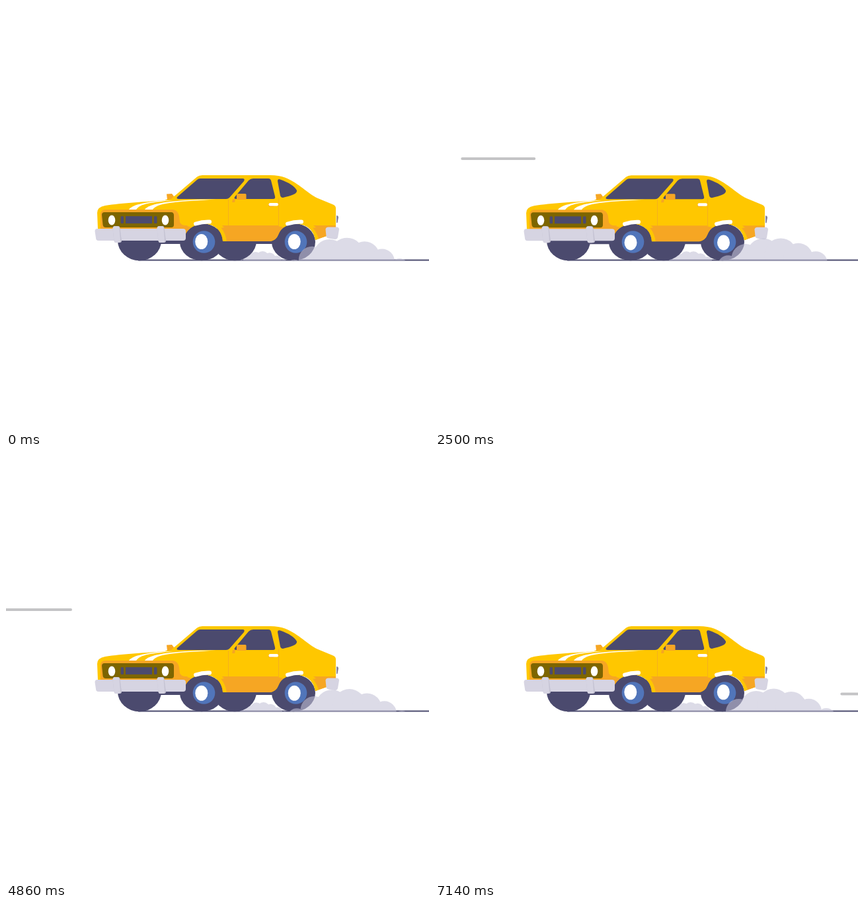
Recreate the animation shown at these times as an HTML page. Size 640 by 640 pixels, loop 7210 ms.

```html
<!DOCTYPE html>
<html lang="en">
<head>
<meta charset="utf-8">
<title>Yellow car</title>
<style>
  html, body { margin: 0; width: 100%; height: 100%; overflow: hidden; background: #fff; }
  svg { display: block; width: 100vw; height: 100vh; }
  .dark { fill: #4b4a6e; }
  .yellow { fill: #ffc700; }
  .orange { fill: #f6a623; }
  .metal { fill: #d6d4e2; }
  .white { fill: #fff; }
  .blue { fill: #5175ba; }
  .seam { stroke: #f6b01c; stroke-width: 1; }
  .shine { fill: none; stroke: #fff; stroke-width: 6; stroke-linecap: round; }
  .rim { fill: none; stroke: #ffc700; stroke-width: 5; }
  .streak { stroke: #c4c4c6; stroke-width: 4; stroke-linecap: round; }
  .dash { stroke: #eac782; stroke-width: 6; stroke-linecap: round; }
  .dust { fill: #c3c1d6; }
</style>
</head>
<body>
<svg viewBox="0 0 640 640">
  <defs>
    <path id="shell" d="M139 338 L138 313 Q138 304 150 302 C175 298 215 296 240 294 L255 287.500 L289 258.500 Q292 256 297 256 L400 256 Q413 256 422 259.500 C445 269 455 283 472 291 L495 300.500 Q499 302 499 306 L499 337 L485 348 L468 354 C466 339 455 329.500 439 329.500 C426 329.500 416 335 412 346 Q409 354 400 356 L328 356 C327 339 315 329.500 300 329.500 C286 329.500 276 336 271 346 L268 350 L139 350 Z"/>
    <path id="screen" d="M259 289 L289 263 Q291 261 294 261 L358 261 Q362 261 360 265 L338 290 Q336 292 333 292 L262 292 Q257 292 259 289 Z"/>
    <clipPath id="inShell"><use href="#shell"/></clipPath>
    <clipPath id="inScreen"><use href="#screen"/></clipPath>
    <clipPath id="aboveGround"><rect y="300" width="640" height="85.200"/></clipPath>
  </defs>

  <g id="streaks"></g>
  <path d="M200 384.500 H640" stroke="#4b4a6e" stroke-width="1.800"/>
  <g id="dashes"></g>

  <g clip-path="url(#aboveGround)" opacity=".58">
    <g id="farDust" class="dust" transform="translate(385 384.500) scale(.4) translate(-508 -384.500)"></g>
  </g>

  <g class="dark">
    <ellipse cx="202" cy="355" rx="33" ry="30.200"/>
    <ellipse cx="346" cy="355" rx="33" ry="30.200"/>
    <ellipse cx="296" cy="357" rx="33" ry="28.200"/>
    <ellipse cx="435" cy="357" rx="33" ry="28.200"/>
  </g>

  <g id="car">
    <path class="dark" d="M232 345 H275 V360 H232 Z M320 350 H415 V360 H320 Z"/>
    <use href="#shell" class="yellow"/>
    <g clip-path="url(#inShell)">
      <path class="orange" d="M139 350 V340 L143 337 V314 Q144 308 150 308 H252 Q260 308.500 262 318 L263 327 Q265 332 272 332 H500 V360 H139 Z"/>
      <path class="yellow" d="M274 333 Q284 324 300 323 Q320 324 330 335 L300 340 Z M412 333 Q424 323 440 323 Q456 324 469 335 L440 340 Z"/>
      <path class="rim" d="M308 328.500 Q328 333 331.500 357 M448 328.500 Q466 334 471.500 356"/>
    </g>
    <path class="white" d="M186 308 C191 300 215 296 243 294 L253 294 C220 297 203 299 197 308 Z M210 308 C216 299 246 295 290 293 L318 292.500 C262 296 228 297 222 308 Z"/>
    <use href="#screen" class="dark"/>
    <g clip-path="url(#inScreen)">
      <path id="glare" class="white" d="M285 258 H306 L309 295 H288 Z M315 258 H320 L323.500 295 H318.500 Z"/>
    </g>
    <path class="dark" d="M346 289 L367 264 Q370 261 374 261 H397 Q400 261 401 264 L407 288 Q408 292 404 292 H349 Q344 292 346 289 Z M411 265 Q411 261 415 262.500 C428 267 437 273 440 279 C441 284 432 287 419 290 Q416 290 415 287 Z"/>
    <path class="seam" d="M336.500 293 V332 M412.500 290 V332"/>
    <path class="orange" d="M243 284.500 L251 284 L254 288 L250 292 L244 293 Z M343 292 H347 L346 297 H342 Z"/>
    <rect class="orange" x="349" y="284" width="14.500" height="9" rx="1.500"/>
    <rect class="orange" x="397" y="298.500" width="9" height="5" rx="2"/>
    <rect class="white" x="397.500" y="298" width="14.500" height="4.500" rx="2.200"/>
    <path class="shine" d="M287 329.500 Q298 326 308 326.500 M426 329.500 Q437 326 447 326.500"/>
    <path d="M500 317 Q503 317 503 320 L501.500 328 H500 Z" fill="#85849f"/>
    <path class="metal" d="M487 334.500 H501 Q504 335 504 338 L502 350 Q501 353 498 353 L488 351.500 Q485 351 484.500 348 L483.500 338 Q483.500 335 487 334.500 Z"/>
    <path d="M149 312 H250 Q253.500 312 254 316 V331 Q254 335 250 335 H151 Q147 335 146.500 331 L145 316 Q145 312 149 312 Z" fill="#7d6500"/>
    <path class="dark" d="M181 318 H221 V329 H181 Z"/>
    <rect class="dark" x="173.500" y="318" width="4.500" height="11" rx="1.500"/>
    <rect class="dark" x="224" y="318" width="4.500" height="11" rx="1.500"/>
    <ellipse class="white" cx="160" cy="324" rx="5.300" ry="7.500"/>
    <ellipse class="white" cx="241" cy="324" rx="5.300" ry="7.500"/>
    <path class="metal" d="M138 337 H268 Q272 337 272 341 V351 Q272 355 268 355 H140 Q136 355 136 351 L134.500 341 Q134.500 337 138 337 Z"/>
    <path id="post" d="M165 333 H170 Q172 333 172.500 336 L175 355 Q175 358 172 358 H166 Q164 358 163.500 355 L161.500 337 Q161.500 333 165 333 Z" fill="#c5c3d3"/>
    <path class="metal" d="M165 333 H168 Q171 333 171.500 336 L173 355 Q173 358 170 358 H166 Q164 358 163.500 355 L161.500 337 Q161.500 333 165 333 Z"/>
    <g transform="translate(67 0)">
      <use href="#post"/>
      <path class="metal" d="M165 333 H168 Q171 333 171.500 336 L173 355 Q173 358 170 358 H166 Q164 358 163.500 355 L161.500 337 Q161.500 333 165 333 Z"/>
    </g>
  </g>

  <g class="blue">
    <circle cx="299.500" cy="357" r="16.800"/>
    <circle cx="438.500" cy="357" r="16.800"/>
  </g>
  <g id="hubs" class="white">
    <ellipse cx="299.500" cy="356.500" rx="9.500" ry="11.500"/>
    <ellipse cx="440" cy="356.500" rx="9.500" ry="11.500"/>
  </g>

  <g clip-path="url(#aboveGround)" opacity=".58">
    <g id="nearDust" class="dust"></g>
  </g>
</svg>
<script>
const LOOP = 7210, CYCLE = 30, TAU = Math.PI * 2;
const $ = id => document.getElementById(id);

function add(parent, tag, attrs) {
  const el = document.createElementNS('http://www.w3.org/2000/svg', tag);
  return set(parent.appendChild(el), attrs);
}
function set(el, attrs) {
  for (const key in attrs) el.setAttribute(key, attrs[key]);
  return el;
}
const show = (el, on) => set(el, { visibility: on ? 'visible' : 'hidden' });
const since = (p, start) => (p - start + CYCLE) % CYCLE;

const streaks = [[231, 1], [320, 7], [358.5, 17]].map(([y, start]) => ({
  start, el: add($('streaks'), 'path', { class: 'streak', d: `M-11 ${y} h109` })
}));

// y, home position of the right end, reach, length, start
const dashes = [[269.5, 435, 76, 51, 20], [283, 445, 75, 56, 3], [301.5, 455, 75, 51, 4]]
  .map(([y, home, reach, len, start]) => ({
    home, reach, start, el: add($('dashes'), 'path', { class: 'dash', d: `M-3 ${y} h${6 - len}` })
  }));

const puffs = ['farDust', 'nearDust'].map(id =>
  Array.from({ length: 8 }, () => add($(id), 'circle', {})));

function dust(p) {
  const turn = p / 7.5 % 1;
  for (const row of puffs) row.forEach((el, i) => {
    const x = 516 + 26.5 * (i - 4 + turn), u = (x - 436) / 164;
    const on = u > 0 && u < 1;
    show(el, on);
    if (!on) return;
    const h = 34 * Math.sin(Math.PI * u ** 0.87), r = 13 + h * 0.35;
    set(el, { cx: x, cy: 384.5 - h + r, r });
  });
}

function draw(t) {
  // 14 pictures a second, sampled from a 25 fps motion
  const step = Math.floor((t % LOOP + 5) * 0.014);
  const p = Math.ceil(step * 25 / 14 - 0.5) % CYCLE;
  const a = TAU * p / CYCLE;

  set($('car'), { transform: `translate(0 ${4 * (1 - Math.cos(a))})` });
  set($('hubs'), { transform: `translate(${-3.8 * Math.cos(a)} ${3.6 * Math.sin(a)})` });
  set($('glare'), { transform: `translate(${78 * (p - 26)} 0)` });

  for (const s of streaks) {
    const d = since(p, s.start);
    show(s.el, d < 14);
    set(s.el, { transform: `translate(${52.2 * d} 0)` });
  }
  for (const s of dashes) {
    const d = since(p, s.start);
    show(s.el, d < 8);
    set(s.el, { transform: `translate(${s.home + s.reach * Math.sin(Math.PI * d / 8)} 0)` });
  }
  dust(p);
}

const begin = performance.now();
function tick() {
  draw(performance.now() - begin);
  requestAnimationFrame(tick);
}
tick();
</script>
</body>
</html>
```
